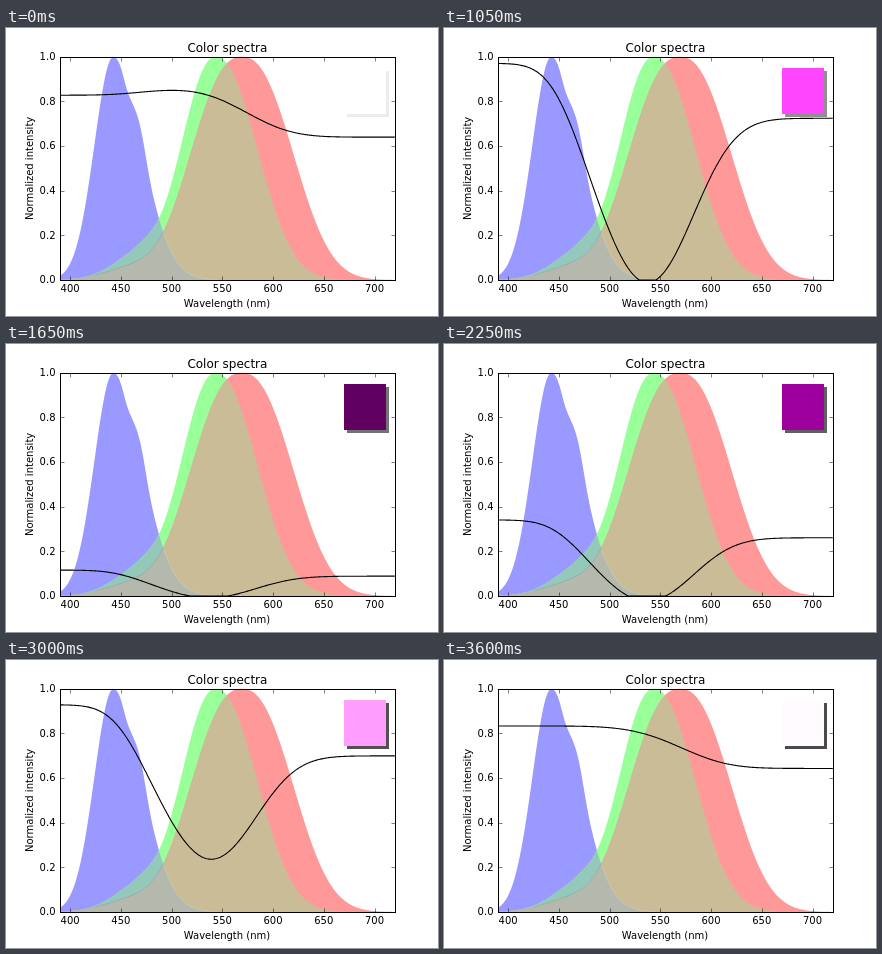
An HTML page for the animation above (3750 ms loop, 432 by 288 pixels).

```html
<!DOCTYPE html>
<html lang="en">
<head>
<meta charset="utf-8">
<title>Color spectra</title>
<style>
  html, body { margin: 0; width: 100%; height: 100%; overflow: hidden; background: #fff; }
  svg { display: block; width: 432px; height: 288px; }
  text { font-family: "DejaVu Sans", sans-serif; font-size: 10px; fill: #000; }
</style>
</head>
<body>
<svg id="stage" viewBox="0 0 432 288" xmlns="http://www.w3.org/2000/svg"></svg>
<script>
const STEP = 150, STEPS = 25;
const MIN = 390, MAX = 720;
const px = nm => 54 + (nm - MIN) * 334.8 / (MAX - MIN);
const py = v => 252 - v * 223.2;

const stage = document.getElementById('stage');
function add(tag, attrs, text) {
  const el = document.createElementNS('http://www.w3.org/2000/svg', tag);
  for (const key in attrs) el.setAttribute(key, attrs[key]);
  if (text) el.textContent = text;
  return stage.appendChild(el);
}

// Lopsided bell with its own width on each side of the center
function bell(nm, center, left, right, power = 2) {
  const d = nm - center;
  return Math.exp(-(Math.abs(d / (d < 0 ? left : right)) ** power));
}
const shortCone = nm => bell(nm, 442.6, 26.4, 39.6) - .04 * bell(nm, 456, 6, 6) + .05 * bell(nm, 470, 7, 7);
const mediumCone = nm => bell(nm, 543.6, 46.3, 54.6, 2.2) + .11 * bell(nm, 468, 37, 25);
const longCone = nm => bell(nm, 569.2, 64, 64.3, 2.4) + .047 * bell(nm, 458, 38, 28);

function trace(fn, from = MIN, to = MAX) {
  let d = '';
  for (let nm = from; nm <= to; nm++) {
    d += (d ? 'L' : 'M') + px(nm).toFixed(2) + ' ' + py(fn(nm)).toFixed(2);
  }
  return d;
}
const area = (fn, fill) => add('path', { d: trace(fn) + `L${px(MAX)} 252L54 252Z`, fill });
const both = (f, g) => nm => Math.min(f(nm), g(nm));
const hairline = (fn, from, to, stroke) =>
  add('path', { d: trace(fn, from, to), fill: 'none', stroke, 'stroke-width': .6 });

add('rect', { width: 432, height: 288, fill: '#fff' });
area(shortCone, '#9999ff');
area(mediumCone, '#99ff99');
area(longCone, '#ff9999');
area(both(mediumCone, longCone), '#cbbc98');
area(both(mediumCone, shortCone), '#93c8bb');
area(both(longCone, shortCone), '#b5b8ad');
hairline(longCone, 425, 492, '#99a09c');
hairline(shortCone, 492, 545, '#d3cfbd');

const shadow = add('rect', { x: 341, y: 43, width: 42, height: 46 });
const swatch = add('rect', { x: 338, y: 40, width: 42, height: 46 });
const curve = add('path', { fill: 'none', stroke: '#000', 'stroke-width': 1.1 });

// Axes
const tick = d => add('path', { d, stroke: '#000', 'stroke-width': .5 });
for (let nm = 400; nm <= 700; nm += 50) {
  const x = Math.round(px(nm)) + .5;
  tick(`M${x} 252.5v-4M${x} 29.5v4`);
  add('text', { x: px(nm), y: 264, 'text-anchor': 'middle' }, String(nm));
}
for (let i = 0; i <= 5; i++) {
  const y = Math.round(py(i / 5)) + .5;
  tick(`M54.5 ${y}h4M389.5 ${y}h-4`);
  add('text', { x: 49.5, y: Math.round(py(i / 5) + 3.3), 'text-anchor': 'end' }, (i / 5).toFixed(1));
}
add('rect', { x: 54.5, y: 29.5, width: 335, height: 223, fill: 'none', stroke: '#000' });
add('text', { x: 221.4, y: 24, 'text-anchor': 'middle', style: 'font-size:12px' }, 'Color spectra');
add('text', { x: 221, y: 279, 'text-anchor': 'middle' }, 'Wavelength (nm)');
add('text', { transform: 'translate(26.5 140.4) rotate(-90)', 'text-anchor': 'middle' },
  'Normalized intensity');

const linear = c => c <= .04045 ? c / 12.92 : ((c + .055) / 1.055) ** 2.4;

// Normal cumulative distribution
function cdf(z) {
  const t = 1 / (1 + .2316419 * Math.abs(z));
  const tail = Math.exp(-z * z / 2) * .3989423 * t *
    (.3193815 + t * (-.3565638 + t * (1.781478 + t * (-1.821256 + t * 1.330274))));
  return z > 0 ? 1 - tail : tail;
}

// Straight ramp starting at `center`, its corner rounded over `width`
const ramp = (center, width) => nm => {
  const z = (nm - center) / width;
  return width * (z * cdf(z) + .3989423 * Math.exp(-z * z / 2));
};
const BLUE = 447, GREEN = 556, RED = 597, DIP = 540;
const blue = ramp(BLUE, 22), green = ramp(GREEN, 42), red = ramp(RED, 33);

// Smooth spectrum, level at both ends, passing through `mid` at DIP
function spectrum(left, right, mid) {
  const span = RED - GREEN, drop = left - right;
  const bend = green(DIP) - red(DIP);
  const fall = (left - mid - bend * drop / span) /
    (blue(DIP) - green(DIP) - bend * (GREEN - BLUE) / span);
  const rise = (fall * (GREEN - BLUE) - drop) / span;
  return nm => Math.max(0, left - fall * blue(nm) + (fall + rise) * green(nm) - rise * red(nm));
}

function draw(step) {
  // Magenta whose lightness swings from white to black and back
  const light = Math.abs(Math.cos(Math.PI * step / STEPS));
  const high = Math.min(1, 2 * light), low = Math.max(0, 2 * light - 1);
  const v = linear(high), g = linear(low);

  const extra = Math.max(0, 1 - g / .061);
  const left = v * (.98 - .152 * g + .022 * extra);
  const right = v * (.73 - .09 * g + .037 * extra);
  const mid = v * (-.065 + .887 * g);
  curve.setAttribute('d', trace(spectrum(left, right, mid)));

  const h = Math.round(high * 255), l = Math.round(low * 255);
  swatch.setAttribute('fill', `rgb(${h},${l},${h})`);
  // The shadow builds up with every step
  const grey = Math.round(60 + 195 * .9 ** (step + 1));
  shadow.setAttribute('fill', `rgb(${grey},${grey},${grey})`);
}

let shown = -1;
const start = performance.now();
function play() {
  const step = Math.floor((performance.now() - start) / STEP) % STEPS;
  if (step !== shown) draw(shown = step);
  requestAnimationFrame(play);
}
play();
</script>
</body>
</html>
```
